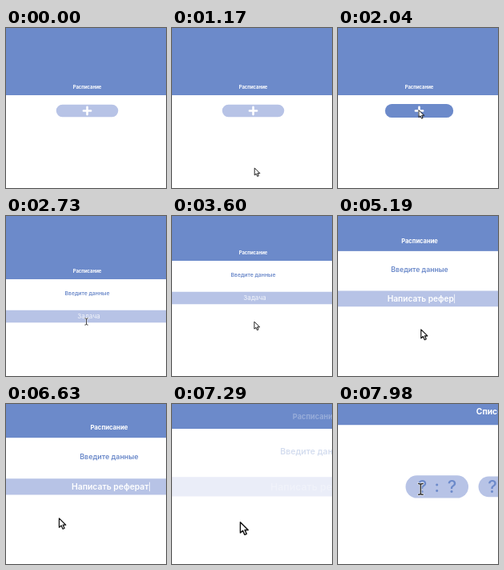
Animation of 200x200 px, one loop 8 s. Source, as an HTML page with a canvas:

```html
<!DOCTYPE html>
<html lang="ru">
<head>
<meta charset="utf-8">
<style>
html, body { margin: 0; width: 100%; height: 100%; overflow: hidden; background: #fff; }
canvas { display: block; width: 100vw; height: 100vh; }
</style>
</head>
<body>
<canvas id="stage"></canvas>
<script>
const LOOP = 8000, MID = 101.5;
const BLUE = '#6c8aca', LIGHT = '#b7c3e6';
const TASK = 'Написать реферат';
const canvas = document.getElementById('stage');
const ctx = canvas.getContext('2d');
const dpr = window.devicePixelRatio || 1;
canvas.width = canvas.height = 200 * dpr;

const ramp = (t, from, to) => Math.min(1, Math.max(0, (t - from) / (to - from)));
const sine = (t, from, to) => (1 - Math.cos(Math.PI * ramp(t, from, to))) / 2;
const easeOut = (t, from, to) => 1 - (1 - ramp(t, from, to)) ** 2;
const mix = (a, b, k) => a + (b - a) * k;

function pill(x, y, w, h, r, color, alpha = 1) {
  ctx.globalAlpha = alpha;
  ctx.fillStyle = color;
  ctx.beginPath();
  ctx.roundRect(x - w / 2, y - h / 2, w, h, r);
  ctx.fill();
  ctx.globalAlpha = 1;
}

function label(text, x, y, size, weight, color, alpha = 1) {
  ctx.globalAlpha = alpha;
  ctx.font = `${weight} ${size}px Inter, "Open Sans", sans-serif`;
  ctx.textAlign = 'center';
  ctx.textBaseline = 'alphabetic';
  ctx.fillStyle = color;
  ctx.fillText(text, x, y);
  const width = ctx.measureText(text).width;
  ctx.globalAlpha = 1;
  return width;
}

function drawPlus(x, y, alpha) {
  ctx.globalAlpha = alpha;
  ctx.strokeStyle = '#fff';
  ctx.lineWidth = 2.6;
  ctx.lineCap = 'round';
  ctx.beginPath();
  ctx.moveTo(x - 4.6, y);
  ctx.lineTo(x + 4.6, y);
  ctx.moveTo(x, y - 4.6);
  ctx.lineTo(x, y + 4.6);
  ctx.stroke();
  ctx.globalAlpha = 1;
}

function drawArrow(x, y) {
  const shape = new Path2D('M0 0V8.6L2 6.8 3.5 10.1 5 9.4 3.6 6.3H6.3Z');
  ctx.save();
  ctx.translate(x, y);
  ctx.shadowColor = 'rgba(0,0,0,.35)';
  ctx.shadowBlur = 1.5 * dpr;
  ctx.shadowOffsetX = ctx.shadowOffsetY = 0.6 * dpr;
  ctx.fillStyle = '#fff';
  ctx.fill(shape);
  ctx.shadowColor = 'transparent';
  ctx.strokeStyle = '#111';
  ctx.lineWidth = 0.9;
  ctx.lineJoin = 'round';
  ctx.stroke(shape);
  ctx.restore();
}

function drawBeam(x, y) {
  const beam = new Path2D('M-1.7 -4.2Q0 -4.2 0 -3.2Q0 -4.2 1.7 -4.2M0 -3.2V3.2M-1.7 4.2Q0 4.2 0 3.2Q0 4.2 1.7 4.2');
  ctx.save();
  ctx.translate(x, y);
  ctx.lineCap = 'round';
  for (const [color, width] of [['rgba(255,255,255,.8)', 1.7], ['#333', 0.9]]) {
    ctx.strokeStyle = color;
    ctx.lineWidth = width;
    ctx.stroke(beam);
  }
  ctx.restore();
}

function cursorAt(t) {
  let x = mix(104, 101, sine(t, 870, 1750));
  let y = mix(201, 103, sine(t, 870, 1750));
  x += -0.5 * sine(t, 2120, 2450) + 2.4 * sine(t, 2760, 3100);
  y += 29 * sine(t, 2120, 2450) + 8 * sine(t, 2760, 3050) - 7.5 * sine(t, 3080, 3450);
  x -= 61.3 * sine(t, 6350, 6750);
  y -= 28.2 * sine(t, 7200, 7800);
  return { x, y };
}

function drawInput(t, y, open, alpha) {
  const hover = easeOut(t, 1670, 1800) * (1 - open);
  const width = mix(77.5, 440, open) + 7.7 * hover;
  const height = 15.5 + 1.6 * hover;
  pill(MID, y, width, height, mix(height / 2, 0, ramp(open, 0.8, 1)), LIGHT, alpha);
  if (hover > 0) pill(MID, y, width, height, height / 2, BLUE, hover);
  drawPlus(MID, y, 1 - ramp(t, 2090, 2220));

  if (t < 3780) {
    label('Задача', MID + 2, y + 2.7, 8.1, 400, '#fff', 0.85 * ramp(t, 2330, 2480));
    return;
  }
  const count = Math.max(0, Math.floor((t - 4020) / 90) + 1);
  const textX = MID + 1;
  const typed = label(TASK.slice(0, count), textX, y + 2.9, 7.9, 600, '#fff', alpha);
  ctx.globalAlpha = alpha;
  ctx.fillStyle = '#fff';
  ctx.fillRect(textX + typed / 2 + 0.4, y - 4.4, 0.6, 8.8);
  ctx.globalAlpha = 1;
}

function drawTimeFields(t, y, alpha) {
  const grow = 1 + 0.1 * sine(t, 7840, 7980);
  pill(106.6, y, 43, 15.5, 7.75, LIGHT, alpha);
  pill(53.9, y, 43 * grow, 15.5 * grow, 7.75 * grow, LIGHT, alpha);
  for (const center of [53.9, 106.6]) {
    label('?', center - 11, y + 4.7, 13.2, 500, BLUE, alpha);
    label(':', center, y + 3.7, 12, 600, BLUE, alpha);
    label('?', center + 11.3, y + 4.7, 13.2, 500, BLUE, alpha);
  }
}

function draw(t) {
  const zoom = 1 + 0.28 * sine(t, 3960, 4740) + 0.38 * sine(t, 6340, 7800);
  const panX = MID + 0.5 * sine(t, 3960, 4740) + 102.5 * easeOut(t, 6370, 8220);
  const panY = 102.5 + 0.9 * sine(t, 3960, 4740);
  const open = sine(t, 2100, 2450);
  const header = 84 - 28 * sine(t, 2475, 3400);
  const fieldY = header + mix(19.5, 46.5, open);
  const oldAlpha = 1 - ramp(t, 7150, 7350);
  const newAlpha = ramp(t, 7350, 7600);
  const cursor = cursorAt(t);

  ctx.setTransform(dpr, 0, 0, dpr, 0, 0);
  ctx.fillStyle = '#fff';
  ctx.fillRect(0, 0, 200, 200);
  ctx.translate(panX, panY);
  ctx.scale(zoom, zoom);
  ctx.translate(-MID, -102.5);

  ctx.fillStyle = BLUE;
  ctx.fillRect(-300, -200, 800, 200 + header);
  label('Расписание', MID, header - 7.8, 5.9, 700, '#fff', oldAlpha);
  label('Список дел', MID, header - 7.8, 6.2, 700, '#fff', newAlpha);
  label('Введите данные', MID, header + 20.4, 6.8, 600, BLUE, ramp(t, 2250, 2460) * oldAlpha);

  if (oldAlpha > 0) drawInput(t, fieldY, open, oldAlpha);
  if (newAlpha > 0) drawTimeFields(t, fieldY, newAlpha);

  const overField = open === 1 && Math.abs(cursor.y - fieldY) < 7.75;
  if (t >= 870) (overField ? drawBeam : drawArrow)(cursor.x, cursor.y);
}

function tick() {
  draw(performance.now() % LOOP);
  requestAnimationFrame(tick);
}
tick();
</script>
</body>
</html>
```
